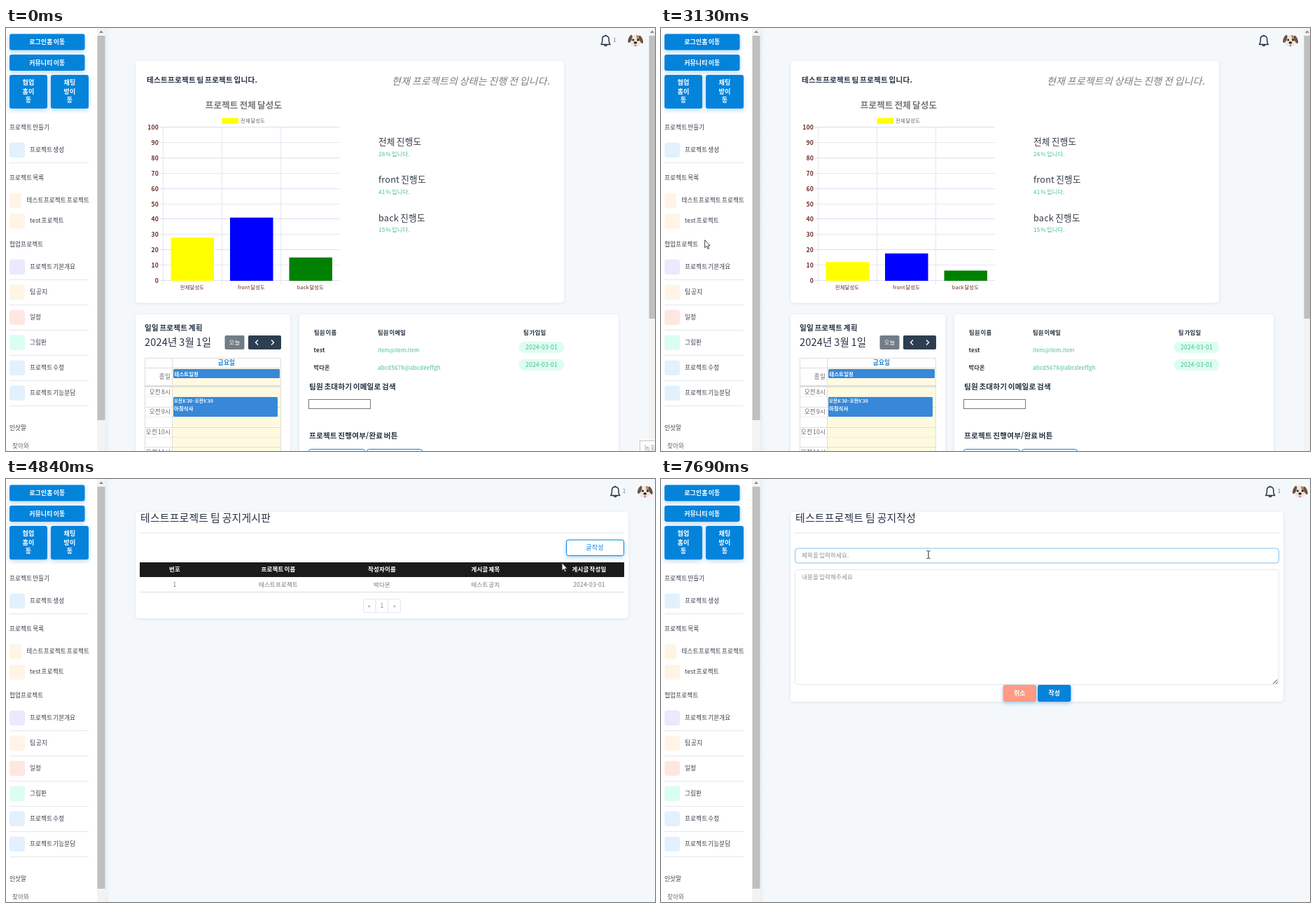
An HTML page for the animation above (8 s loop, 927 by 604 pixels).

```html
<!DOCTYPE html>
<html lang="ko">
<head>
<meta charset="utf-8">
<title>프로젝트 관리</title>
<style>
html, body { margin: 0; width: 100%; height: 100%; overflow: hidden; background: #f4f8fb; }
svg { display: block; width: 927px; height: 604px; white-space: pre;
  font-family: 'Noto Sans CJK KR', 'Noto Sans CJK', sans-serif; letter-spacing: .012em; word-spacing: -.1em; }
.card { fill: #fff; filter: drop-shadow(0 1px 2px rgba(60, 80, 110, .12)); }
.lift { filter: drop-shadow(0 2px 3px rgba(30, 130, 220, .35)); }
</style>
</head>
<body>
<svg id="stage" viewBox="0 0 927 604"></svg>
<script>
const LOOP = 8000;
const INK = '#343c48', NAVY = '#263244', BLUE = '#0483db', GREEN = '#48be8c', GRAY = '#777';
const MID = 'text-anchor="middle" ', END = 'text-anchor="end" ', STRONG = 'font-weight="600" ', BOLD = 'font-weight="700" ';

// y is the vertical middle of the line
const text = (x, y, str, size, fill = INK, more = '') =>
  `<text x="${x}" y="${(y + size * .37).toFixed(2)}" font-size="${size}" fill="${fill}" ${more}>${str}</text>`;
const rect = (x, y, w, h, fill, more = '') =>
  `<rect x="${x}" y="${y}" width="${w}" height="${h}" fill="${fill}" ${more}/>`;
const line = (x1, y1, x2, y2, color, more = '') =>
  `<path d="M${x1} ${y1}L${x2} ${y2}" stroke="${color}" fill="none" ${more}/>`;
const card = (x, y, w, h) => rect(x, y, w, h, '#fff', 'rx="5" class="card"');
const outline = (x, y, w, h, color, more = '') =>
  rect(x + .5, y + .5, w - 1, h - 1, '#fff', `stroke="${color}" ${more}`);
const button = (x, y, w, h, fill, label) =>
  rect(x, y, w, h, fill, 'rx="3" class="lift"') + text(x + w / 2, y + h / 2, label, 8.9, '#fff', MID + STRONG);

const SKY = '#e2f1fd', CREAM = '#fff4e6';
// label, top, colour, narrow width, text x
const items = [
  ['프로젝트 생성', 163.5, SKY],
  ['테스트프로젝트 프로젝트', 236, CREAM, 17, 29.5],
  ['test 프로젝트', 265, CREAM],
  ['프로젝트 기본개요', 330.5, '#ece8fe'],
  ['팀 공지', 366.5, CREAM],
  ['일정', 402.5, '#ffe6e3'],
  ['그림판', 438.5, '#dcfdf1'],
  ['프로젝트 수정', 474.5, SKY],
  ['프로젝트 기능분담', 510.5, SKY]
];

function sidebar() {
  let s = rect(0, 0, 130, 604, '#fff') + rect(142, 0, 6, 604, 'url(#edge)') + rect(130, 0, 12, 604, '#f3f3f3');
  s += '<path d="M133 7l3-3.5 3 3.5z" fill="#8a8a8a"/>' + rect(130.5, 11, 11, 549, '#bfbfbf', 'id="thumb"');
  s += button(5, 8.5, 107.5, 23, BLUE, '로그인홈 이동') + button(5, 38, 107.5, 23, BLUE, '커뮤니티 이동');
  [[5, '협업,홈이,동'], [64, '채팅,방이,동']].forEach(([x, label]) => {
    s += button(x, 67, 54, 48, BLUE, '');
    label.split(',').forEach((part, i) => s += text(x + 27, 77.5 + i * 12.8, part, 9, '#fff', MID + STRONG));
  });
  [['프로젝트 만들기', 142], ['프로젝트 목록', 214], ['협업프로젝트', 309], ['인삿말', 571]]
    .forEach(([label, y]) => s += text(5, y, label, 8.55));
  items.forEach(([label, y, color, w = 22, x = 34], i) => {
    s += rect(5, y, w, 21.5, color, `rx="4" id="item${i}"`) + text(x, y + 10, label, 8.55);
  });
  [192, 359, 395, 431, 467, 503, 539].forEach(y => s += line(5, y + .5, 118, y + .5, '#e4e6ea'));
  return s + text(9, 597, '찾아와', 8.55, '#667');
}

const header = `<g id="bell" fill="none" stroke="${NAVY}" stroke-width="1.5" stroke-linejoin="round">
  <path d="M-6.5 5.5C-4.5 3.5-4.7 1-4.7-2C-4.7-5-2.8-6.7 0-6.7S4.7-5 4.7-2C4.7 1 4.5 3.5 6.5 5.5Z"/>
  <path d="M-2 6q2 3.2 4 0M0-7v-1.3"/></g>${text(0, 17, '1', 8, GRAY, 'id="count"')}
  <g id="dog"><ellipse cy="1" rx="8.5" ry="8.5" fill="#eee6e0"/><path d="M1-7.4q7 0 7 8q-4 2-6-3z" fill="#b98a66"/>
  <ellipse cx="-7.5" cy="-2" rx="2.4" ry="6" fill="#6f5040" transform="rotate(22 -7.5 -2)"/>
  <ellipse cx="8" cy="-1" rx="2.3" ry="6" fill="#6f5040" transform="rotate(-22 8 -1)"/>
  <circle cx="-3.2" cy="-.5" r="1.5" fill="#222"/><circle cx="3.6" cy="-.5" r="1.5" fill="#222"/>
  <ellipse cy="3.4" rx="2.4" ry="1.7" fill="#222"/><ellipse cy="7.4" rx="1.5" ry="1.6" fill="#d9808a"/></g>`;

const bars = [[235.5, 28, '#ffff00', '전체달성도'], [320, 41, '#0000ff', 'front 달성도'], [404.5, 15, '#008000', 'back 달성도']];
const BASE = 361, UNIT = 2.19;

function chart() {
  let s = text(339.5, 110, '프로젝트 전체 달성도', 12.5, '#777', MID + BOLD);
  s += rect(308.5, 128.5, 23.5, 8.5, '#ffff00') + text(335, 132.5, '전체 달성도', 7.3, '#666');
  for (let v = 0; v <= 100; v += 10) {
    const y = Math.round(BASE - v * UNIT) - .5;
    s += line(220, y, 477, y, v % 20 ? '#e6e6f2' : '#dedef4') + text(218, y, v, 8.6, '#6b2a22', END + BOLD);
  }
  [224.5, 308.5, 392.5].forEach(x => s += line(x, 142, x, 366, '#e6e6f0'));
  bars.forEach(([x, v, color, label], i) => {
    s += rect(x, 0, 61.5, 0, color, `id="bar${i}"`) + text(x + 30.5, 370, label, 7.3, '#6b2a22', MID);
  });
  return s;
}

function calendar() {
  let s = card(185, 409, 221, 220) + text(198, 428, '일일 프로젝트 계획', 10.6, NAVY, STRONG);
  s += text(198, 449, '2024년 3월 1일', 14.5, NAVY);
  s += rect(312.5, 439, 28, 20, '#727c86', 'rx="2"') + text(326.5, 449, '오늘', 8.5, '#f2f4f6', MID);
  s += rect(346, 439, 47, 20, '#2c3e50', 'rx="2"');
  s += '<path d="M360 445.5l-3.5 3.5 3.5 3.5M379 445.5l3.5 3.5-3.5 3.5" stroke="#fff" stroke-width="1.4" fill="none"/>';
  s += rect(238, 486, 154, 118, '#fffadf') + text(315, 478, '금요일', 8.6, '#1a7fd0', MID + STRONG);
  s += line(198, 485.5, 393, 485.5, '#ddd') + rect(198, 510, 195, 3, '#dfdfdc');
  for (let i = 1; i < 7; i++) {
    const y = Math.round(513 + i * 14.4) - .5;
    s += line(198, y, 393, y, '#ddd', i % 2 ? 'stroke-dasharray="1 1"' : '');
  }
  s += '<path d="M198.5 604V471.5H392.5V604M237.5 471V604" stroke="#ddd" fill="none"/>';
  s += text(235, 498, '종일', 8.6, '#666', END);
  [8, 9, 10, 11].forEach((h, i) => s += text(235, 519.5 + i * 28.8, `오전 ${h}시`, 8.6, '#666', END));
  s += rect(239, 487, 152, 13, '#3788d8', 'rx="1.5"') + text(240.5, 494, '테스트일정', 7.3, '#fff', STRONG);
  s += rect(239, 527, 149, 28, '#3788d8', 'rx="1.5"') + text(240, 533, '오전8:30 - 오전9:30', 6.4, '#fff', STRONG);
  return s + text(240, 543, '아침식사', 7.3, '#fff', STRONG);
}

function team() {
  let s = card(419, 409, 456, 220);
  [[440, '팀원 이름'], [531, '팀원 이메일'], [739, '팀 가입일']].forEach(([x, label]) => s += text(x, 434.5, label, 8.3, NAVY, STRONG));
  [['test', 'item@item.item', 7.5], ['박다온', 'abcd5678@abcdeeffgh', 8.1]].forEach(([name, mail, size], i) => {
    const y = 460 + i * 25;
    s += text(439.5, y, name, 8.2, NAVY, STRONG) + text(531, y, mail, size, GREEN);
    s += rect(732.5, y - 12, 65, 16, '#dcfdf0', 'rx="8"') + text(765, y - 4, '2024-03-01', 8.6, GREEN, MID);
  });
  s += text(433, 512, '팀원 초대하기 이메일로 검색', 10.6, NAVY, STRONG) + outline(432, 530, 89, 14, '#767676');
  s += text(433, 582.5, '프로젝트 진행여부/완료 버튼', 10.6, NAVY, STRONG);
  return s + outline(432, 601, 81, 22, BLUE, 'rx="3"') + outline(515, 601, 80, 22, BLUE, 'rx="3"');
}

function overview() {
  let s = card(185, 47, 612, 345.5) + text(201, 74, '테스트프로젝트 팀 프로젝트 입니다.', 10.65, NAVY, STRONG);
  s += text(551, 76, '현재 프로젝트의 상태는 진행 전 입니다.', 14, '#7c7c7c', 'font-style="italic" font-weight="300"') + chart();
  [['전체', 28], ['front', 41], ['back', 15]].forEach(([label, v], i) => {
    const y = 162.5 + i * 54.2;
    s += text(532, y, label + ' 진행도', 12.7) + text(532, y + 17.5, v + ' % 입니다.', 8.2, GREEN);
  });
  s += calendar() + team() + rect(918, 0, 9, 604, '#f3f3f3') + rect(918.5, 11, 8.5, 404, '#bfbfbf');
  return s + '<path d="M920 7l3-3.5 3 3.5z" fill="#8a8a8a"/>';
}

const boardTop = (h, title) => card(185, 47, 704, h) + text(192, 55.5, title, 14.9, NAVY) + line(191, 77, 883, 77, '#dfe3e7');

function board() {
  let s = boardTop(152, '테스트프로젝트 팀 공지게시판');
  s += outline(800, 86.5, 83, 23.5, BLUE, 'rx="3" class="lift" id="write"') + text(841, 98, '글작성', 9, BLUE, MID + 'id="writeText"');
  s += rect(191, 119, 692, 21, '#1b1b1c') + line(191, 161.5, 883, 161.5, '#dcdfe2');
  [['번호', 1], ['프로젝트 이름', '테스트프로젝트'], ['작성자이름', '박다온'], ['게시글 제목', '테스트 공지'], ['게시글 작성일', '2024-03-01']]
    .forEach(([head, cell], i) => {
      const x = 241 + i * 148;
      s += text(x, 129, head, 8.5, '#fff', MID + BOLD) + text(x, 151, cell, 8.5, GRAY, MID);
    });
  ['«', '1', '»'].forEach((mark, i) => {
    s += outline(510 + i * 17.7, 171, 18.6, 20, '#e3e7eb', 'rx="1"') + text(519 + i * 17.9, 181, mark, 8.5, '#6d8cab', MID);
  });
  return s;
}

function form() {
  let s = boardTop(271, '테스트프로젝트 팀 공지작성');
  s += outline(191, 98.5, 692, 22, '#e3e6ea', 'rx="4" id="field"') + text(201, 109, '제목을 입력하세요.', 8.5, '#8d8f94');
  s += rect(201, 104, 1, 11, '#222', 'id="caret"');
  s += outline(191, 129, 692, 165, '#e3e6ea', 'rx="4"') + text(201, 140, '내용을 입력해주세요', 8.5, '#8d8f94');
  s += '<path d="M874 292.5l6.5-6M878 292.5l3-2.8" stroke="#345" fill="none"/>';
  return s + button(488.5, 294, 47.5, 24, '#ff9a84', '취소') + button(538, 294, 47.5, 24, BLUE, '작성');
}

const cursors = `<path id="arrow" d="M0 0V11L2.6 8.7 4.4 12.7 6 12 4.3 8.1H7.6Z" fill="#fff" stroke="#333" stroke-width=".9"/>
  <path id="hand" d="M-1.2 9V1Q0-.8 1.2 1V5.5Q2.5 4.6 3.2 6Q4.5 5.3 5.1 6.7Q6.5 6.3 6.4 8.2V11Q6.2 13 5.3 15H-.4Q-1.5 12.5-3.8 9.8Q-4.2 7.7-1.2 9Z" fill="#fff" stroke="#222" stroke-width=".9"/>
  <path id="beam" d="M-2.5-5.5Q0-5.5 0-4.5Q0-5.5 2.5-5.5M0-4.5V4.5M-2.5 5.5Q0 5.5 0 4.5Q0 5.5 2.5 5.5" fill="none" stroke="#222"/>`;

const stage = document.getElementById('stage');
stage.innerHTML = `<defs><linearGradient id="edge"><stop stop-color="#e9eef2"/><stop offset="1" stop-color="#f4f8fb"/></linearGradient></defs>
  ${rect(0, 0, 927, 604, '#f4f8fb')}${sidebar()}
  <g id="overview">${overview()}</g><g id="board">${board()}</g><g id="form">${form()}</g>${header}
  <g id="tip">${outline(905, 589, 40, 30, '#c4c4c4')}${text(911, 600, '녹화', 10, '#999')}</g>
  <g id="cursor">${cursors}</g>`;
const el = {};
stage.querySelectorAll('[id]').forEach(node => el[node.id] = node);

const set = (id, attrs) => { for (const k in attrs) el[id].setAttribute(k, attrs[k]); };
const show = (id, on) => { el[id].style.display = on ? '' : 'none'; };
const clamp = v => Math.max(0, Math.min(1, v));

// the CSS "ease" curve
function ease(p) {
  p = clamp(p);
  const bez = (u, a, b) => 3 * u * (1 - u) * (1 - u) * a + 3 * u * u * (1 - u) * b + u * u * u;
  let lo = 0, hi = 1;
  for (let i = 0; i < 20; i++) {
    const mid = (lo + hi) / 2;
    if (bez(mid, .25, .25) < p) lo = mid; else hi = mid;
  }
  return bez(lo, .1, 1);
}

const loads = [[-1000, 'overview'], [3000, 'overview'], [4300, 'board'], [5350, 'form']];
const track = [
  [300, 737, 578], [350, 545, 533], [400, 352, 487], [450, 178, 436], [600, 178, 436], [950, 80, 385],
  [1250, 38, 345], [1400, 41, 350], [1480, 42, 365], [1650, 40, 374], [1950, 30, 382], [2290, 30, 382],
  [2590, 62, 258], [2800, 70, 245], [2960, 70, 245], [3080, 64, 290], [3400, 55, 370], [3600, 53, 379],
  [4450, 53, 379], [4740, 660, 150], [4790, 730, 132], [4840, 794, 120], [4960, 808, 103], [5350, 806, 105],
  [5460, 792, 110], [5600, 792, 110], [5850, 610, 182], [6100, 430, 135], [6250, 382, 108]
];
const kinds = [[0, 'arrow'], [1230, 'hand'], [1410, 'arrow'], [1560, 'hand'], [2340, 'arrow'], [2560, 'hand'],
  [3000, 'arrow'], [3190, 'hand'], [4330, 'arrow'], [4900, 'hand'], [5350, 'beam']];
// item, enter, leave
const hovers = [[3, 1200, 1410], [4, 1560, 2340], [3, 2360, 2430], [2, 2500, 2570], [1, 2575, LOOP], [3, 3190, 3340], [4, 3345, LOOP]];
const blinks = [[0, 0], [6250, 1], [6400, 0], [6820, 1], [7120, 0], [7420, 1], [7690, 0]];
const latest = (list, t) => list.filter(e => e[0] <= t).pop();

function position(t) {
  const i = track.findIndex(k => k[0] > t);
  if (i < 0) return track[track.length - 1].slice(1);
  const a = track[Math.max(0, i - 1)], b = track[i], p = clamp((t - a[0]) / (b[0] - a[0] || 1));
  return [a[1] + (b[1] - a[1]) * p, a[2] + (b[2] - a[2]) * p];
}

function draw(t) {
  const [loaded, page] = latest(loads, t);
  const wide = page === 'overview', counted = t - loaded > 180;
  ['overview', 'board', 'form'].forEach(id => show(id, id === page));
  show('tip', t < 90);

  const right = wide ? 0 : 13.7;
  set('bell', { transform: `translate(${(counted ? 856.5 : 861) + right} 18)` });
  set('count', { x: 867 + right });
  show('count', counted);
  set('dog', { transform: `translate(${899 + right} 17.5)` });
  set('thumb', { height: wide ? 549 : 574 });

  items.forEach(([, , , w = 22], i) => {
    const grow = hovers.filter(h => h[0] === i && h[1] >= loaded)
      .reduce((m, h) => Math.max(m, ease((t - h[1]) / 300) * (1 - ease((t - h[2]) / 300))), 0);
    set('item' + i, { width: w + (113 - w) * grow });
  });

  const rise = t < 3000 ? 1 : 1 - (1 - clamp((t - 3000) / 1000)) ** 4;
  bars.forEach(([, v], i) => {
    const h = v * UNIT * rise + .5;
    set('bar' + i, { y: BASE - h, height: h });
  });

  const fill = ease((t - 4900) / 150);
  set('write', { fill: fill ? BLUE : '#fff', 'fill-opacity': fill || 1 });
  set('writeText', { fill: fill > .5 ? '#fff' : BLUE });
  const focus = ease((t - 6250) / 150);
  const mix = (a, b) => Math.round(a + (b - a) * focus);
  set('field', { stroke: `rgb(${mix(227, 130)},${mix(230, 193)},${mix(234, 237)})` });
  show('caret', latest(blinks, t)[1]);

  show('cursor', t >= 300);
  set('cursor', { transform: `translate(${position(t).map(v => v.toFixed(2)).join(' ')})` });
  const kind = latest(kinds, t)[1];
  ['arrow', 'hand', 'beam'].forEach(id => show(id, id === kind));
}

const start = performance.now();
function tick() {
  draw((performance.now() - start) % LOOP);
  requestAnimationFrame(tick);
}
tick();
</script>
</body>
</html>
```
